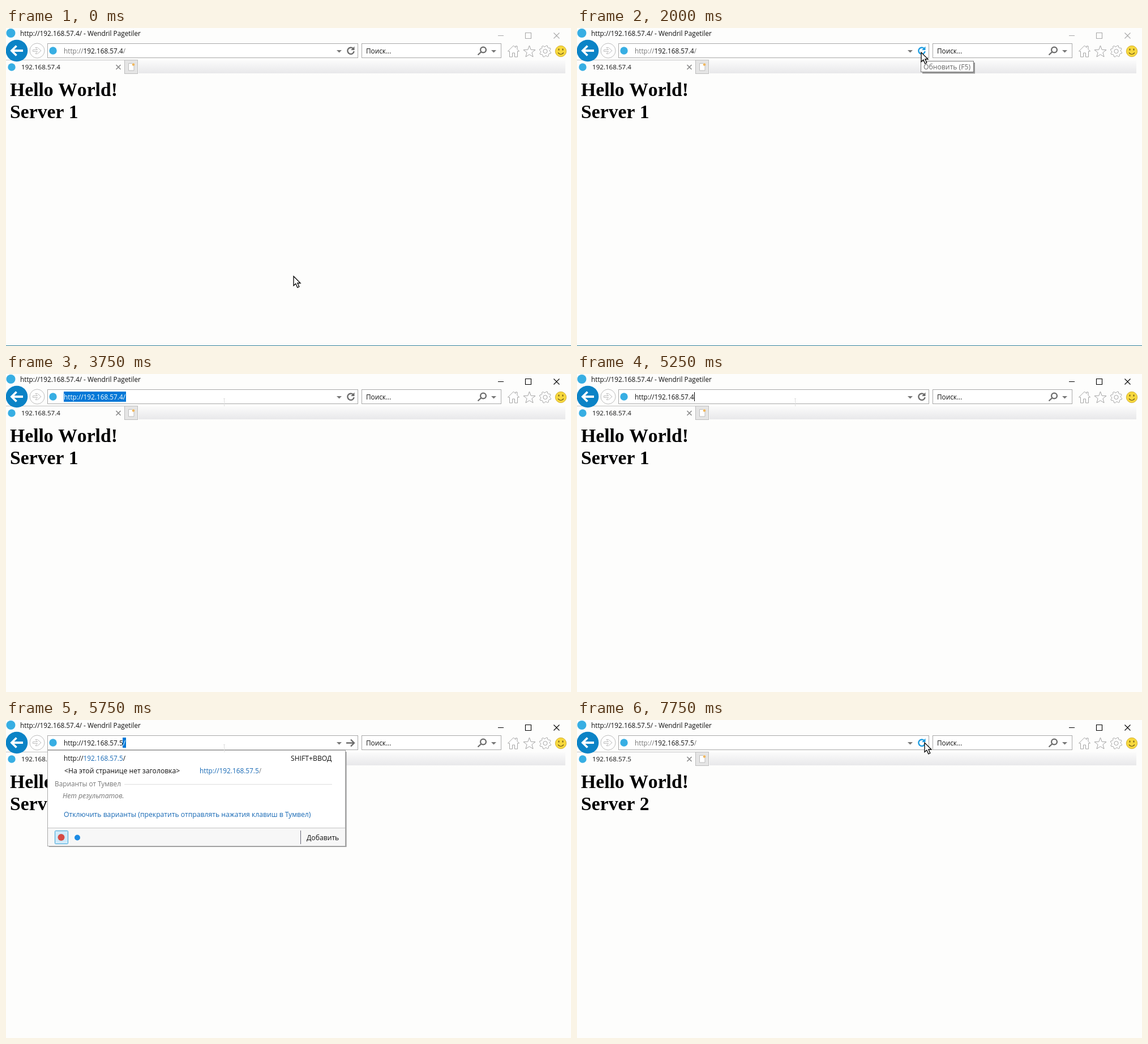
Recreate the animation shown at these times as an HTML page. Size 998x561 px, loop 8000 ms.

```html
<!DOCTYPE html>
<html lang="ru">
<head>
<meta charset="utf-8">
<title>Server switch demo</title>
<style>
  html, body { margin: 0; width: 100%; height: 100%; overflow: hidden; background: #fdfdfc; }
  svg { display: block; width: 100%; height: 100%; font: 11.8px "Open Sans", "Noto Sans", sans-serif; fill: #111; }
  .field { fill: #fff; stroke: #a9a9a9; }
  .icon { fill: #fff; stroke: #a3a3a3; }
  .faint { fill: #fff; stroke: #bdbdbd; }
  .bold { fill: none; stroke: #6b6b6b; stroke-width: 2.3; }
  .logo { fill: #37aee3; }
  .gray { fill: #777; }
  .link { fill: #1769b5; }
  .hint { font-size: 12.2px; }
  .page { font: bold 33.7px "Liberation Serif", serif; font-kerning: none; fill: #000; }
</style>
</head>
<body>
<svg viewBox="0 0 998 561">
  <defs>
    <linearGradient id="strip" x2="0" y2="1">
      <stop stop-color="#fbfbfb"/><stop offset="1" stop-color="#e8e8ea"/>
    </linearGradient>
  </defs>
  <rect width="998" height="561" fill="#fdfdfc"/>

  <!-- title bar -->
  <circle class="logo" cx="8.5" cy="9" r="8"/>
  <text x="25" y="14" id="title"></text>
  <path id="controls" fill="none" stroke-width="1.1" d="M869 13.5H879M917.5 8.5h10v10h-10zM967.5 8.5l10 10m0-10l-10 10"/>

  <!-- navigation -->
  <path d="M0 56.5H209" stroke="#c3c3c3"/>
  <circle cx="19" cy="40" r="19.3" fill="#0b83c6"/>
  <path d="M30 40H11M18.5 31.5L10 40l8.5 8.5" fill="none" stroke="#fff" stroke-width="3.8"/>
  <circle class="faint" cx="55" cy="40" r="13"/>
  <path class="faint" d="M47.5 38.5h8l-3.5-4h3.5l6.5 5.5-6.5 5.5h-3.5l3.5-4h-8z"/>
  <rect class="field" x="73.5" y="27.5" width="548" height="25"/>
  <circle class="logo" cx="83" cy="40" r="6.7"/>
  <rect id="selection" y="31" height="18" fill="#0078d7"/>
  <text x="102" y="45" id="url"></text>
  <path id="caret" stroke="#000"/>
  <path class="gray" d="M584 39h9l-4.5 4.5z"/>
  <g id="refresh">
    <path fill="none" stroke-width="2.3" d="M613.5 36.6A5.7 5.7 0 1 0 614.7 41"/>
    <path stroke="none" d="M615.5 32.5v6.5h-6.5z"/>
  </g>
  <path id="go" class="bold" d="M601 40.5H614M609 34.5l6 6-6 6"/>

  <rect class="field" x="628.5" y="27.5" width="246" height="25"/>
  <text x="636" y="45">Поиск...</text>
  <circle class="bold" cx="843" cy="38.5" r="4.9"/>
  <path class="bold" d="M839.5 42l-6 5.5"/>
  <path class="gray" d="M857 39h9l-4.5 4.5z"/>

  <path class="icon" d="M886.5 41l10-10 3.5 3.5v-2.5h3v5.5l3.5 3.5h-3v10h-5v-7h-4v7h-5v-10z"/>
  <path id="star" class="icon"/>
  <path id="gear" class="icon"/>
  <circle class="icon" cx="952.5" cy="41" r="3.6"/>
  <circle cx="980" cy="41" r="9.7" fill="#f7d83d" stroke="#d5b23a"/>
  <path d="M975 43.5q5 6 10 0" fill="none" stroke="#6b5518" stroke-width="1.2"/>
  <path d="M976.5 36.5v3M983.5 36.5v3" stroke="#6b5518" stroke-width="1.8"/>

  <!-- tabs -->
  <rect x="234" y="57" width="754" height="23" fill="url(#strip)"/>
  <circle class="logo" cx="10" cy="69" r="6.7"/>
  <text x="27" y="73" font-size="11.6" id="tab"></text>
  <path d="M194.5 65l8 8m0-8l-8 8" fill="none" stroke="#8a8a8a" stroke-width="1.7"/>
  <rect x="209.5" y="56.5" width="23" height="24" fill="#e5e5e5" stroke="#bdbdbd"/>
  <path class="faint" d="M216.5 62.5h6l3.5 3.5v9h-9.5z"/>
  <circle cx="225" cy="64.5" r="2.3" fill="#f0b75e"/>

  <!-- page -->
  <text class="page" x="7" y="120">Hello World!</text>
  <text class="page" x="7" y="159" id="server"></text>
  <path id="edge" d="M0 560.5H998" stroke="#2f7f98"/>

  <!-- address suggestions -->
  <g id="panel">
    <rect id="shade" x="76" y="56" width="525.5" fill="#999"/>
    <rect id="sheet" class="field" x="73.5" y="53.5" width="526"/>
    <text x="102" y="72">http://<tspan class="link">192.168.57.5</tspan>/</text>
    <text class="hint" x="503" y="72">SHIFT+ВВОД</text>
    <text class="hint" x="103" y="94">&lt;На этой странице нет заголовка&gt;</text>
    <text class="link" x="342" y="94">http://192.168.57.5<tspan class="gray">/</tspan></text>
    <text class="gray" x="86" y="117">Варианты от Тумвел</text>
    <path d="M209 113.5H576" stroke="#ddd"/>
    <text class="hint gray" x="100" y="138" font-style="italic">Нет результатов.</text>
    <text class="hint link" x="102" y="171">Отключить варианты (прекратить отправлять нажатия клавиш в Тумвел)</text>
    <g id="footer">
      <rect x="74" y="190" width="525" height="32" fill="#f7f7f7"/>
      <path d="M74 190.5H599" stroke="#c4c4c4"/>
      <rect x="86.5" y="195.5" width="23" height="23" rx="1" fill="#cfeafa" stroke="#3ba3d8"/>
      <circle cx="97.5" cy="207" r="6" fill="#d64b45"/>
      <circle cx="126" cy="207.5" r="5" fill="#1c8be4"/>
      <path d="M520.5 195V219" stroke="#667"/>
      <text class="hint" x="531" y="212">Добавить</text>
    </g>
  </g>

  <g id="tooltip">
    <rect x="610" y="61" width="93" height="19.5" fill="#999"/>
    <rect x="607.5" y="58.5" width="93" height="19" fill="#fff" stroke="#767676"/>
    <text class="hint" x="612" y="73" fill="#666">Обновить (F5)</text>
  </g>

  <path id="beam" d="M384 43.5h3M385.5 44V57" fill="none" stroke="#dedede"/>
  <path id="arrow" d="M0 0V16.5L3.8 13l3 6.8 3-1.3L6.9 12H12z" fill="#fff" stroke="#000" stroke-width="1.3"/>
</svg>
<script>
const LOOP = 8000, STEP = 250;
const el = Object.fromEntries([...document.querySelectorAll('[id]')].map(e => [e.id, e]));
const show = (e, on) => e.style.display = on ? '' : 'none';
const set = (e, attrs) => { for (const k in attrs) e.setAttribute(k, attrs[k]); };
const within = (t, a, b) => t >= a && t < b;

// time, x, y of the pointer tip
const pointer = [
  [0, 508, 438], [1000, 608, 43], [3000, 608, 43], [3500, 384, 42],
  [6000, 374, 42], [6750, 374, 42], [7250, 632, 44], [7500, 620, 42], [7750, 614, 40]
];

// start time, text, selected range in px, caret
const edits = [
  [3500, '192.168.57.4/', [102, 212]],
  [4000, '192.168.57.4/', null, 212],
  [4250, '192.168.57.4/'],
  [4500, '192.168.57.4/', null, 212],
  [5000, '192.168.57.4', null, 207],
  [5500, '192.168.57.', null, 200],
  [5750, '192.168.57.5/', [206, 212]],
  [6000, '192.168.57.5/']
];

function pointerAt(t) {
  const i = pointer.findIndex(p => p[0] > t);
  if (i < 0) return pointer.at(-1).slice(1);
  const [t0, x0, y0] = pointer[i - 1], [t1, x1, y1] = pointer[i];
  const u = (t - t0) / (t1 - t0), k = u * u * (3 - 2 * u);
  return [x0 + (x1 - x0) * k, y0 + (y1 - y0) * k];
}

function radialPath(cx, cy, count, radius) {
  const points = Array.from({ length: count }, (_, i) => {
    const a = i / count * 2 * Math.PI - Math.PI / 2, r = radius(i);
    return [cx + r * Math.cos(a), cy + r * Math.sin(a)].map(v => v.toFixed(1));
  });
  return 'M' + points.join('L') + 'z';
}

function drawUrl(t, host) {
  const editing = within(t, 3500, 7500);
  const [, text, range, caret] = editing ? edits.findLast(e => e[0] <= t) : [];
  show(el.selection, range);
  show(el.caret, caret);
  if (range) set(el.selection, { x: range[0], width: range[1] - range[0] });
  if (caret) set(el.caret, { d: `M${caret + .5} 32V48` });
  if (!editing) {
    el.url.innerHTML = `<tspan class="gray">http://</tspan>${host}<tspan class="gray">/</tspan>`;
  } else if (range) {
    const full = 'http://' + text, cut = range[0] === 102 ? 0 : full.length - 1;
    el.url.innerHTML = `${full.slice(0, cut)}<tspan fill="#fff">${full.slice(cut)}</tspan>`;
  } else {
    el.url.textContent = 'http://' + text;
  }
}

function draw(t) {
  const second = t >= 6250, host = '192.168.57.' + (second ? 5 : 4);
  el.title.textContent = `http://${host}/ - Wendril Pagetiler`;
  el.tab.textContent = host;
  el.server.textContent = 'Server ' + (second ? 2 : 1);
  drawUrl(t, host);

  const focused = t >= 2250;
  set(el.controls, { stroke: focused ? '#000' : '#a8a8a8' });
  show(el.edge, !focused);

  const typing = within(t, 5500, 6000);
  const color = within(t, 1000, 3250) || t >= 7500 ? '#1b9be0' : '#6b6b6b';
  set(el.refresh, { fill: color, stroke: color });
  show(el.refresh, !typing);
  show(el.go, typing);

  const extra = t < 5750 ? 135 : 0;
  show(el.panel, typing);
  set(el.sheet, { height: 169 + extra });
  set(el.shade, { height: 168 + extra });
  set(el.footer, { transform: `translate(0 ${extra})` });

  show(el.tooltip, within(t, 1750, 3250));
  const beam = within(t, 3500, 6250);
  show(el.beam, beam);
  show(el.arrow, !beam);
  set(el.arrow, { transform: `translate(${pointerAt(t)})` });
}

set(el.star, { d: radialPath(924.5, 42, 10, i => i % 2 ? 4.6 : 11) });
set(el.gear, { d: radialPath(952.5, 41, 32, i => (i + 1) % 4 < 2 ? 8 : 10.3) });

const start = performance.now();
function frame() {
  const t = (performance.now() - start) % LOOP;
  draw(Math.floor(t / STEP) * STEP);
  requestAnimationFrame(frame);
}
frame();
</script>
</body>
</html>
```
